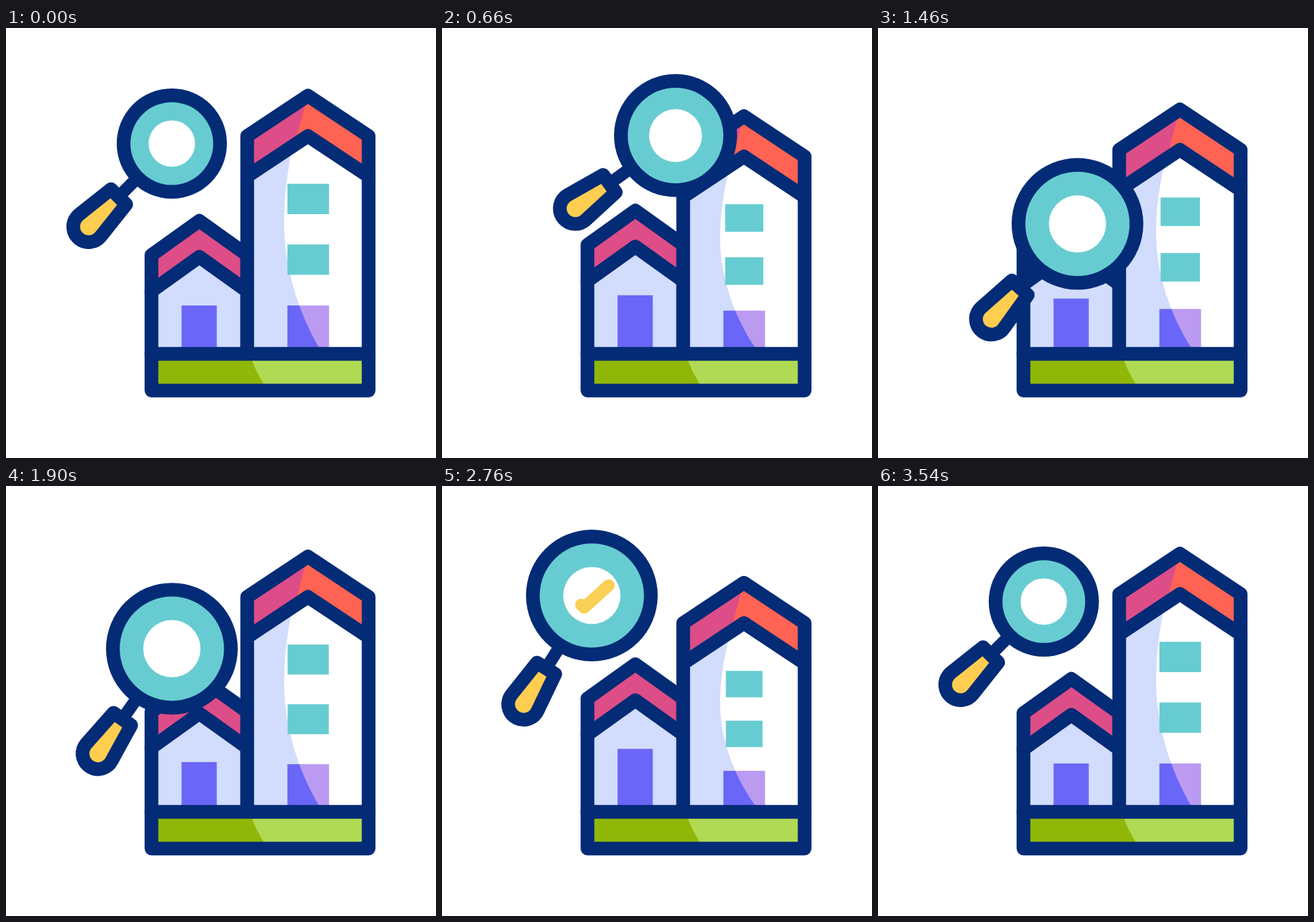
An HTML page with a canvas that plays this animation: 640x640 px, repeating every 3.6 s.

```html
<!DOCTYPE html>
<html>
<head>
<meta charset="utf-8">
<style>
html, body { margin: 0; height: 100%; overflow: hidden; background: #fff; }
canvas { display: block; width: 640px; height: 640px; }
</style>
</head>
<body>
<canvas id="stage" width="640" height="640"></canvas>
<script>
const ctx = document.getElementById("stage").getContext("2d");
const LOOP = 3600, LINE = 20.4;
const NAVY = "#032b76", TEAL = "#67ccd1", YELLOW = "#ffcd4f", PINK = "#dd4d88",
  ORANGE = "#ff6353", LAVENDER = "#d2dcfc", PURPLE = "#6a66f7", LILAC = "#bb9af1",
  OLIVE = "#90b608", LIME = "#b0da53";

// Each key: time, then the values reached at that time.
const sinkKeys = [[200, 0], [1000, 51], [1800, 0], [2600, 51], [3400, 0]];
const checkKeys = [[2500, 0], [2900, 1], [3000, 1], [3300, 0]];
const glassKeys = [ // x, y, radius, handle angle
  [200, 246.8, 172, 82, 135],
  [1000, 415.5, 152, 98, 150],
  [1600, 271, 322, 98, 128.2],
  [2200, 223, 163, 98, 122.1],
  [3000, 223, 163, 98, 122.1],
  [3400, 246.8, 172, 82, 135]
];

const ease = x => (x + (1 - Math.cos(Math.PI * x)) / 2) / 2;

function valuesAt(keys, t) {
  if (t <= keys[0][0]) return keys[0].slice(1);
  const i = keys.findIndex(k => k[0] > t);
  if (i < 0) return keys[keys.length - 1].slice(1);
  const a = keys[i - 1], b = keys[i];
  const f = ease((t - a[0]) / (b[0] - a[0]));
  return a.slice(1).map((v, n) => v + (b[n + 1] - v) * f);
}

function polygon(points) {
  const path = new Path2D();
  points.forEach(([x, y]) => path.lineTo(x, y));
  return path;
}

function fill(path, color) {
  ctx.fillStyle = color;
  ctx.fill(path);
}

function stroke(path, width = LINE, color = NAVY) {
  ctx.lineWidth = width;
  ctx.strokeStyle = color;
  ctx.stroke(path);
}

function rect(x, y, w, h, color) {
  ctx.fillStyle = color;
  ctx.fillRect(x, y, w, h);
}

function disc(x, y, r, color) {
  ctx.beginPath();
  ctx.arc(x, y, r, 0, 7);
  ctx.fillStyle = color;
  ctx.fill();
}

function within(clip, draw) {
  ctx.save();
  ctx.clip(clip);
  draw();
  ctx.restore();
}

// Gabled outline: left wall, apex and right wall down to the ground.
function gable(left, right, apex, eave) {
  return polygon([[left, 485], [left, eave], [(left + right) / 2, apex], [right, eave], [right, 485]]);
}

function strokeGable(left, right, apex, eave, band) {
  stroke(gable(left, right, apex, eave));
  stroke(polygon([[left, eave + band], [(left + right) / 2, apex + band], [right, eave + band]]));
}

function drawHouse(rise) {
  const apex = 287 - rise, eave = 338 - rise, band = 53.6;
  fill(gable(216.5, 359, apex, eave), PINK);
  fill(gable(216.5, 359, apex + band, eave + band), LAVENDER);
  rect(261.3, 413 - rise, 52.4, 72 + rise, PURPLE);
  strokeGable(216.5, 359, apex, eave, band);
}

function drawTower(sink) {
  const apex = 100.7 + sink, eave = 160.7 + sink, band = 60;
  const squash = y => 474 - (474 - y) * (1 - sink / 242);
  const roof = gable(359, 539.7, apex, eave);
  const wall = gable(359, 539.7, apex + band, eave + band);
  const doorTop = squash(413);

  const roofShade = new Path2D();
  roofShade.moveTo(340, 90 + sink);
  roofShade.lineTo(453, 90 + sink);
  roofShade.quadraticCurveTo(437, 140 + sink, 423, 203 + sink);
  roofShade.lineTo(340, 240 + sink);

  const wallShade = new Path2D();
  wallShade.moveTo(340, squash(170));
  wallShade.lineTo(428, squash(170));
  wallShade.bezierCurveTo(418, squash(215), 414, squash(252), 414, squash(290));
  wallShade.bezierCurveTo(414, squash(360), 437, squash(425), 465, 474);
  wallShade.lineTo(471, 486);
  wallShade.lineTo(340, 486);

  fill(roof, ORANGE);
  within(roofShade, () => fill(roof, PINK));
  fill(wall, "#fff");
  rect(418.8, doorTop, 62, 485 - doorTop, LILAC);
  within(wallShade, () => {
    fill(wall, LAVENDER);
    rect(418.8, doorTop, 62, 485 - doorTop, PURPLE);
  });
  const w = 62 - 0.17 * sink, h = 45.2 - 0.136 * sink;
  rect(449.8 - w / 2, 231.8 + sink, w, h, TEAL);
  rect(449.8 - w / 2, 322.2 + 0.625 * sink, w, h, TEAL);
  strokeGable(359, 539.7, apex, eave, band);
}

function drawGround() {
  rect(216.5, 485, 323.2, 54.6, LIME);
  const shade = new Path2D("M216 485H363Q371 514 391 540H216Z");
  fill(shade, OLIVE);
  const frame = new Path2D();
  frame.rect(216.5, 485, 323.2, 54.6);
  stroke(frame);
}

function drawGlass([x, y, r, angle], checked) {
  ctx.save();
  ctx.translate(x, y);

  ctx.save();
  ctx.rotate(angle * Math.PI / 180);
  stroke(polygon([[r - 8, 0], [r + 30, 0]]), 18.5);
  const handle = new Path2D();
  handle.moveTo(r + 30, -16);
  handle.arc(r + 93, 0, 23, -1.68, 1.68);
  handle.lineTo(r + 30, 16);
  handle.closePath();
  fill(handle, YELLOW);
  stroke(handle);
  ctx.restore();

  disc(0, 0, r, NAVY);
  disc(0, 0, r - LINE, TEAL);
  disc(0, 0, 34.6 + (r - 82) / 2, "#fff");
  if (checked > 0) {
    ctx.setLineDash([80 * checked, 200]);
    stroke(polygon([[25, -15], [-11.5, 18], [-32, -2]]), 18, "#facf55");
    ctx.setLineDash([]);
  }
  ctx.restore();
}

function draw(now) {
  const t = now % LOOP;
  const [sink] = valuesAt(sinkKeys, t);
  const [checked] = valuesAt(checkKeys, t);
  ctx.lineJoin = ctx.lineCap = "round";
  rect(0, 0, 640, 640, "#fff");
  drawHouse(sink / 2);
  drawTower(sink);
  drawGround();
  drawGlass(valuesAt(glassKeys, t), checked);
}

const start = performance.now();
function tick() {
  draw(performance.now() - start);
  requestAnimationFrame(tick);
}
tick();
</script>
</body>
</html>
```
